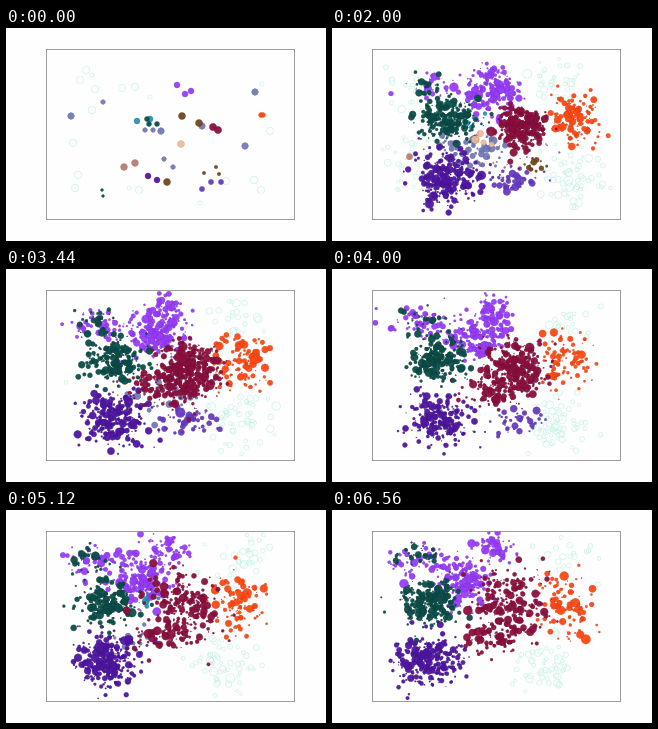
Write a matplotlib script that moves like this. It is 320x213 px and loops after 6.64 s.

```python
import numpy as np
import matplotlib.pyplot as plt
from matplotlib.animation import FuncAnimation
from matplotlib.colors import to_rgb, to_rgba

W, H, DPI = 320, 213, 64
FRAMES, STEP = 83, 80
LIFE = 9
LEFT, RIGHT, TOP, BOTTOM = 40, 288, 21.3, 190.7
PAPER = "#fdfefd"

MINT, SLATE, TEAL, GREEN = "#c8f3e8", "#7279b8", "#2596ac", "#0b4d49"
VIOLET, WINE, ORANGE = "#983cfb", "#8b0f3e", "#ff4813"
INDIGO, PURPLE = "#5016a2", "#673ac3"
BROWN, TAN, ROSE = "#70461c", "#f2ba98", "#ba7c70"
LAYERS = [MINT, SLATE, TEAL, VIOLET, GREEN, BROWN, ROSE, TAN,
          INDIGO, PURPLE, ORANGE, WINE]  # back to front

rng = np.random.default_rng(11)
dots = []  # x, y, radius, birth, life, colour


def opening(colour, radius, *spots):
    """Dots already on the plot when the loop starts."""
    for x, y in spots:
        dots.append((x, y, radius, 0, rng.integers(4, LIFE), colour))


def smooth(u):
    u = np.clip(u, 0, 1)
    return u * u * (3 - 2 * u)


def cloud(colour, count, start, end, spread, begin=0.0, stop=2.0, swell=1.0):
    """Short-lived dots around a centre gliding from start to end.

    begin and stop are shares of the loop; swell widens the cloud over it.
    """
    start, end, spread = map(np.array, (start, end, spread))
    for birth in range(1, FRAMES):
        u = (birth + LIFE / 2) / FRAMES
        centre = start + (end - start) * smooth(u)
        sigma = spread * (1 + (swell - 1) * smooth(u))
        level = smooth((u - begin) / 0.14) * smooth((stop - u) / 0.14)
        for x, y in rng.normal(centre, sigma,
                               (rng.poisson(count * level / LIFE), 2)):
            low, span = (2, 2.8) if colour == MINT else (1, 3.9)
            r = low + span * rng.beta(1, 2)
            if LEFT + 3 < x < RIGHT - 3 and TOP + 1 < y < BOTTOM - 2:
                dots.append((x, y, r, birth, LIFE, colour))


# Opening state: rings around the rim, a few solid dots inside
opening(MINT, 3.6, (80, 42), (74, 52), (89, 61), (116, 60), (129, 59),
        (86, 82), (67, 115), (72, 147), (69, 160), (133, 162),
        (264, 103), (248, 152), (255, 162), (220, 153))
opening(MINT, 2, (86, 47), (144, 69), (123, 160), (256, 56), (194, 175))
opening(SLATE, 3.3, (65, 88), (155, 103), (196, 98), (249, 64), (239, 118))
opening(SLATE, 2.3, (97, 74), (139, 102), (147, 102), (158, 131), (167, 139))
opening(VIOLET, 3, (179, 66), (185, 63), (171, 57))
opening(TEAL, 3, (131, 93), (144, 91))
opening(GREEN, 2.5, (141, 91), (143, 96), (151, 96))
opening(GREEN, 1.4, (96, 162), (97, 168))
opening(BROWN, 3.5, (176, 88), (161, 154), (193, 95))
opening(BROWN, 1.7, (198, 145), (210, 139), (213, 146))
opening(WINE, 3.6, (207, 99), (212, 102))
opening(ORANGE, 2.4, (255, 87), (257, 87))
opening(TAN, 3.4, (175, 116))
opening(ROSE, 3.4, (118, 139), (129, 135))
opening(INDIGO, 3, (142, 148), (151, 152))
opening(PURPLE, 2.6, (196, 161), (205, 154), (215, 154))

# Hollow rings: the left side empties, the right side stays
cloud(MINT, 20, (76, 68), (76, 68), (15, 19), stop=0.55)
cloud(MINT, 28, (78, 138), (85, 135), (14, 18), stop=0.5)
cloud(MINT, 28, (224, 54), (240, 46), (17, 12), stop=1.1)
cloud(MINT, 60, (249, 146), (213, 157), (17, 15), stop=1.13)

# Early groups that die out
cloud(SLATE, 55, (148, 128), (172, 120), (14, 10), stop=0.62)
cloud(SLATE, 16, (214, 109), (214, 109), (12, 8), stop=0.5)
cloud(SLATE, 22, (115, 122), (130, 126), (11, 9), stop=0.57)
cloud(SLATE, 20, (130, 132), (130, 132), (10, 6), begin=0.65, stop=0.92)
cloud(TEAL, 18, (142, 91), (142, 91), (6, 5), stop=0.5)
cloud(TEAL, 16, (143, 88), (143, 88), (7, 5), begin=0.65, stop=0.95)
cloud(BROWN, 22, (202, 139), (202, 139), (6, 6), stop=0.38)
cloud(ROSE, 8, (112, 134), (112, 134), (12, 5), stop=0.4)
cloud(TAN, 7, (150, 106), (130, 118), (8, 6), stop=0.55)
cloud(PURPLE, 50, (182, 154), (186, 150), (14, 7), stop=0.7)

# Lasting groups
cloud(VIOLET, 170, (168, 62), (132, 73), (15, 11))
cloud(VIOLET, 60, (156, 48), (163, 38), (10, 8), begin=0.25)
cloud(VIOLET, 65, (105, 57), (85, 51), (19, 8), begin=0.25)
cloud(GREEN, 215, (122, 93), (97, 92), (14, 11))
cloud(GREEN, 24, (100, 62), (83, 46), (10, 8))
cloud(INDIGO, 255, (121, 150), (99, 151), (16, 13))
cloud(ORANGE, 110, (245, 91), (231, 94), (10, 11), swell=1.6)
cloud(WINE, 215, (197, 101), (176, 95), (9, 8), swell=2.2)
cloud(WINE, 140, (184, 104), (176, 108), (13, 14), begin=0.27, stop=0.65)
cloud(WINE, 65, (146, 108), (161, 128), (15, 8), begin=0.35)

dots.sort(key=lambda d: LAYERS.index(d[5]))
pos = np.array([d[:2] for d in dots], float)
radius, birth, life = np.array([d[2:5] for d in dots], float).T
hollow = np.array([d[5] == MINT for d in dots])
fill = np.array([to_rgba(d[5], 0 if d[5] == MINT else 0.95) for d in dots])
edge = np.array([to_rgb(d[5]) for d in dots])
edge[~hollow] *= 0.8
thick = np.where(hollow, 0.7, 0.35)

fig = plt.figure(figsize=(W / DPI, H / DPI), dpi=DPI, facecolor=PAPER)
ax = fig.add_axes([LEFT / W, 1 - BOTTOM / H,
                   (RIGHT - LEFT) / W, (BOTTOM - TOP) / H], facecolor=PAPER)
ax.set(xlim=(LEFT, RIGHT), ylim=(BOTTOM, TOP), xticks=[], yticks=[])
for spine in ax.spines.values():
    spine.set(linewidth=0.9, color="#858585")
points = ax.scatter([], [])


def draw(frame):
    age = frame - birth
    on = (age >= 0) & (age < life)
    age, span = age[on], life[on]
    pulse = np.sin(np.pi * (age + 1) / (span + 1))
    wave = np.where(birth[on] == 0, np.sqrt(1 - age / span), pulse)
    wave = np.where(hollow[on], 0.35 + 0.65 * wave, wave)
    points.set_offsets(pos[on])
    points.set_sizes((2 * radius[on] * wave * 72 / DPI) ** 2)
    points.set_facecolors(fill[on])
    points.set_edgecolors(edge[on])
    points.set_linewidths(thick[on])
    return (points,)


anim = FuncAnimation(fig, draw, frames=FRAMES, interval=STEP,
                     repeat=True, repeat_delay=0, blit=False)
plt.show()
```
